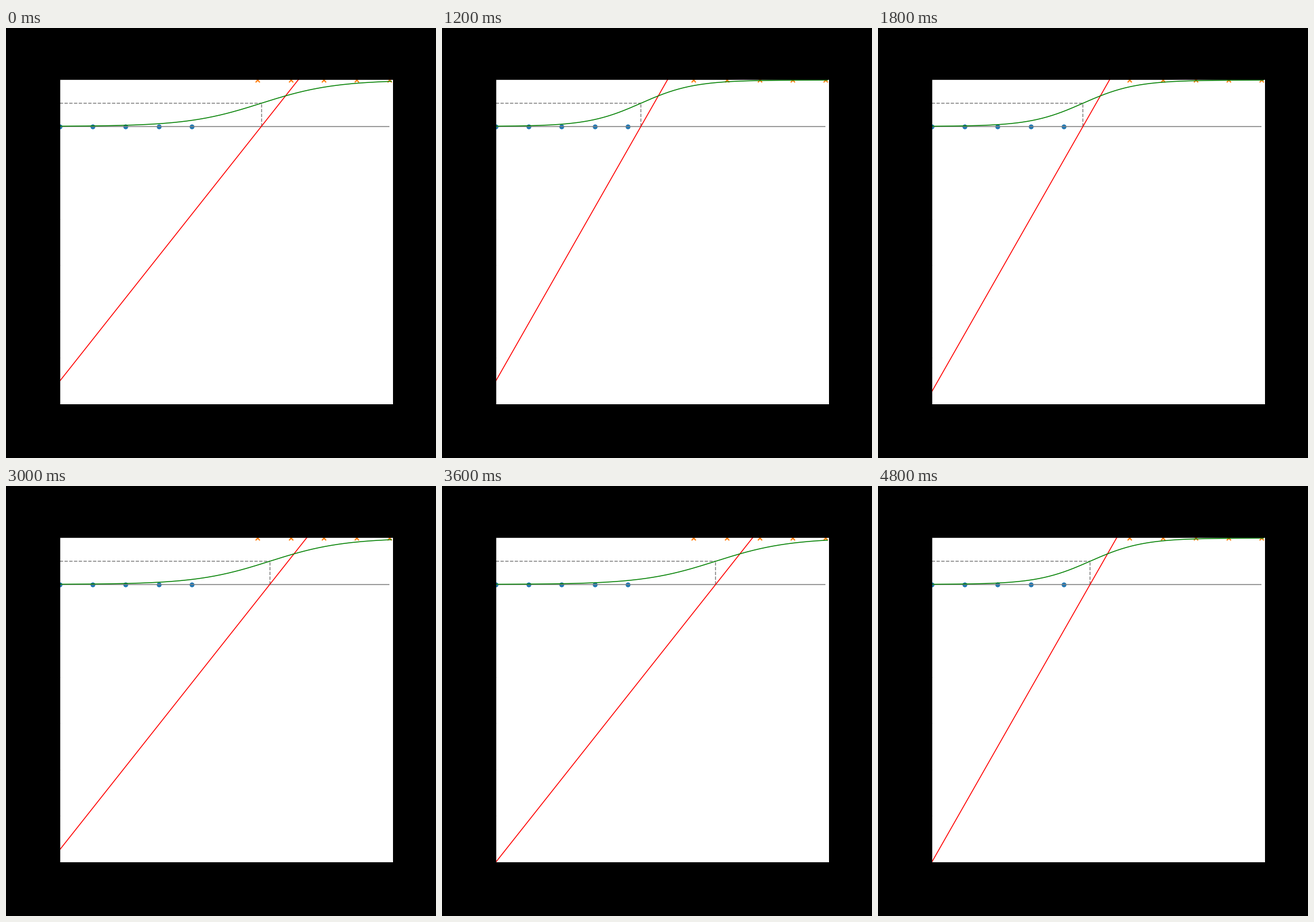
Write a matplotlib script that moves like this. It is 720 by 720 pixels and loops after 5400 ms.

```python
import numpy as np
import matplotlib.pyplot as plt
from matplotlib.animation import FuncAnimation

WEIGHTS = [0.9, 1.14, 1.25]
BIASES = [-5.5, -5.73, -6.0]

# Sweep the grid back and forth: weights run forward, then backward
STEPS = [(w, b) for i, b in enumerate(BIASES)
         for w in (WEIGHTS[::-1] if i % 2 else WEIGHTS)]

fig = plt.figure(figsize=(10, 10), dpi=72, facecolor="black")
ax = fig.add_axes([0.125, 0.125, 0.775, 0.755])
ax.set_xlim(0, 10.1)
ax.set_ylim(-6, 1.01)

# Two classes
low, high = np.arange(5), np.arange(6, 11)
ax.scatter(low, np.zeros(5), s=50, color="C0", marker="o")
ax.scatter(high, np.ones(5), s=50, color="C1", marker="x", linewidths=2)

x = np.arange(0, 10.1, 0.05)
ax.hlines(0, 0, 10, color="gray", linewidth=1.5)
across = ax.hlines(0.5, 0, 1, color="gray", linestyle="--", linewidth=1.5)
down = ax.vlines(1, 0, 0.5, color="gray", linestyle="--", linewidth=1.5)
line, = ax.plot([], [], color="red", linewidth=1.5)
curve, = ax.plot([], [], color="green", linewidth=1.5)


def update(i):
    w, b = STEPS[i]
    z = w * x + b
    edge = -b / w
    line.set_data(x, z)
    curve.set_data(x, 1 / (1 + np.exp(-z)))
    across.set_segments([[(0, 0.5), (edge, 0.5)]])
    down.set_segments([[(edge, 0), (edge, 0.5)]])
    return line, curve, across, down


anim = FuncAnimation(fig, update, frames=len(STEPS), interval=600, repeat=True)
plt.show()
```
